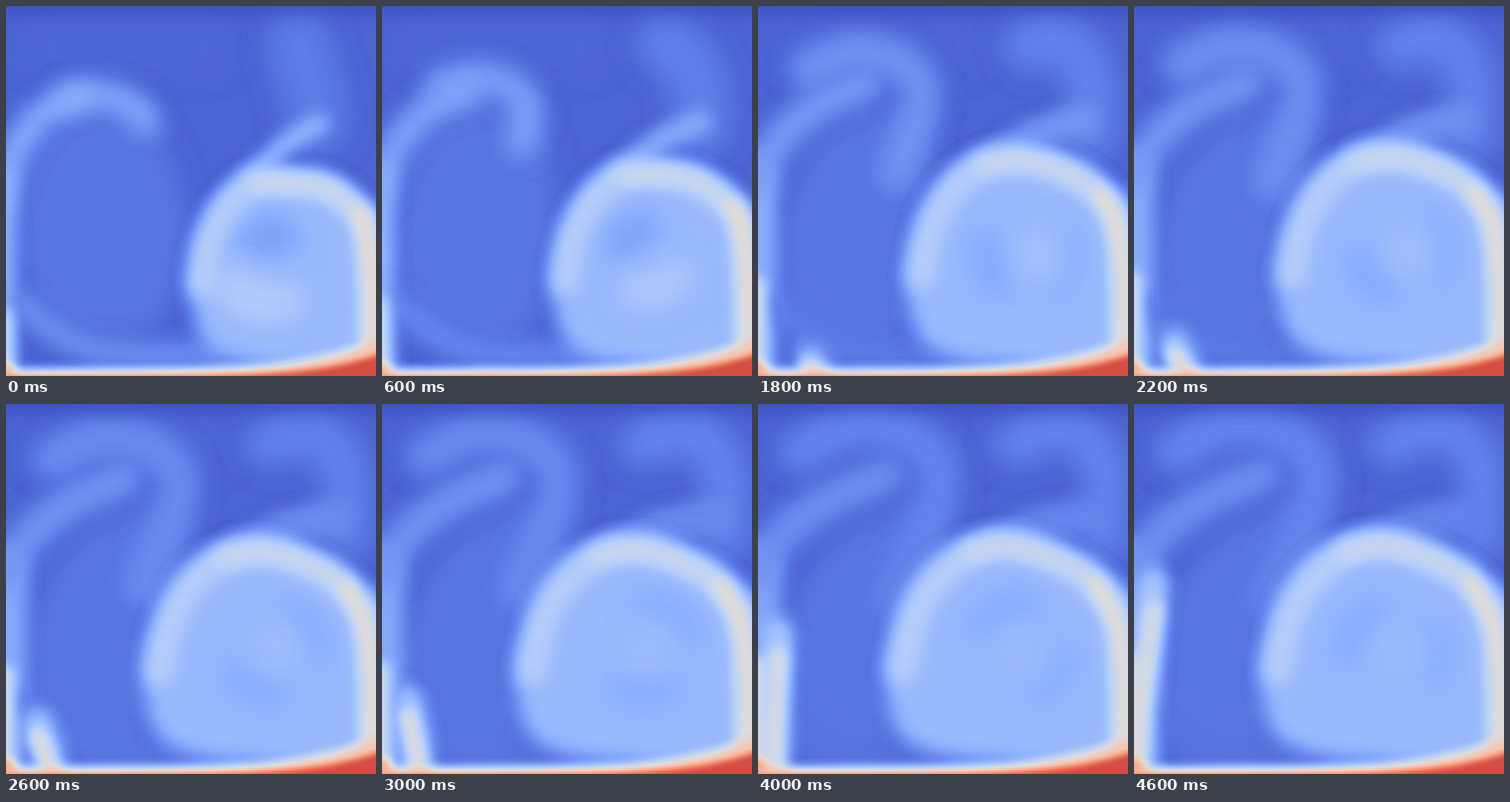
Recreate the animation shown at these times as an HTML page. Size 512 px wide and 512 px high, loop 4800 ms.

```html
<!DOCTYPE html>
<html lang="en">
<head>
<meta charset="utf-8">
<title>Convection</title>
<style>
html, body { margin: 0; width: 100%; height: 100%; overflow: hidden; background: #3b4cc0; }
svg { display: block; width: 100vw; height: 100vh; }
</style>
</head>
<body>
<svg viewBox="0 0 512 512" preserveAspectRatio="none">
  <defs id="defs"></defs>
  <g id="field" filter="url(#coolwarm)"><rect x="-2" y="-2" width="516" height="516" fill="rgb(14,14,14)"/></g>
</svg>
<script>
const NS = 'http://www.w3.org/2000/svg';
const LOOP = 4800, STEP = 200;

// Colours for evenly spaced temperatures from 0 to 1.
const COOLWARM = ['#3b4cc0', '#6282ea', '#8db0fe', '#b8d0f9', '#dddddd', '#f5c4ad', '#f4987a', '#de604d', '#b40426'];

const lerp = (a, b, k) => a + (b - a) * k;
const mix = (a, b, k) => a.map((p, i) => [lerp(p[0], b[i][0], k), lerp(p[1], b[i][1], k)]);
const morph = (from, to) => (p, e) => mix(from, to, e);

// The large cell; its first seven points are the upper-left edge.
const cell = morph(
  [[258, 390], [270, 320], [302, 262], [345, 232], [400, 232], [455, 242], [500, 278], [540, 330], [540, 490], [380, 500], [280, 470]],
  [[178, 370], [197, 290], [230, 232], [282, 190], [340, 177], [410, 196], [475, 234], [540, 300], [540, 490], [340, 495], [205, 465]]);

// The ring runs just inside that edge and down the right wall.
const ring = first => (p, e) => cell(p, e).slice(0, 7)
  .map(([x, y]) => [lerp(x, 370, .1), lerp(y, 360, .1)])
  .concat([[496, 302], [505, 370], [507, 470]]).slice(first);

// A short arc turning with the flow inside the cell.
const swirl = (lag, radius) => (p, e) => [-35, 0, 35].map(spread => {
  const angle = (270 - 270 * p - lag + spread) * Math.PI / 180, r = radius(e);
  return [365 + r * Math.cos(angle), 345 + r * Math.sin(angle)];
});

// Heated floor, thicker towards the right corner.
const floor = (base, slope, rise) => () => {
  const top = [];
  for (let u = -.1; u < 1.15; u += .1) top.push([u * 512, base - slope * u - rise * u ** 6]);
  return [...top, [620, 560], [-60, 560]];
};

// The young plume drifts left along the floor while it climbs.
const plume = lag => p => {
  const root = 155 - 154 * p, tip = 28 + 190 * (1 - p) ** 3, y = 535 - 270 * p * p + lag * p;
  return [[root, 540], [lerp(root, tip, .4), lerp(530, y, .5)], [tip, y]];
};

// v: temperature and w: stroke width, each from start to end; no w means a filled shape.
const layers = [
  { blur: 18, v: [.068, .06], w: [70, 70], path: () => [[60, 55], [280, 55]] },
  { blur: 18, v: [.098, .098], path: morph(
    [[15, 300], [70, 160], [190, 150], [250, 300], [200, 450], [60, 440]],
    [[40, 300], [120, 180], [250, 140], [210, 290], [190, 480], [40, 480]]) },
  // left wall, bottom sweep, left plume
  { blur: 11, v: [.29, .22], w: [26, 70], path: morph([[-2, 235], [-2, 560]], [[-2, 225], [-2, 560]]) },
  { blur: 14, v: [.17, .09], w: [30, 30], path: () => [[20, 410], [65, 450], [140, 480], [300, 480]] },
  { blur: 15, v: [.25, .165], w: [36, 48], path: morph(
    [[-10, 270], [10, 205], [50, 150], [100, 125]], [[0, 230], [35, 180], [100, 132], [180, 98]]) },
  { blur: 16, v: [.25, .132], w: [34, 62], path: morph(
    [[85, 128], [125, 122], [160, 130], [185, 145], [195, 162]],
    [[60, 65], [130, 30], [215, 45], [252, 115], [190, 270]]) },
  // right plume: cap and tail
  { blur: 18, v: [.115, .135], w: [90, 62], path: morph(
    [[405, 50], [412, 80], [425, 120], [430, 160]], [[355, 55], [430, 32], [478, 85], [480, 185]]) },
  { blur: 10, v: [.26, .13], w: [28, 52], path: morph(
    [[335, 240], [385, 193], [432, 163]], [[305, 208], [380, 170], [460, 155]]) },
  // cell, cool pockets, warm core, ring
  { blur: 13, v: [.29, .285], path: cell },
  { blur: 18, v: [.2, .25], w: [52, 42], path: swirl(0, e => 30 + 35 * e) },
  { blur: 18, v: [.3, .235], w: [40, 40], path: swirl(150, () => 72) },
  { blur: 18, v: [.37, .3], w: [46, 46], path: swirl(165, e => 68 * (1 - e)) },
  { blur: 12, v: [.38, .375], w: [34, 38], path: ring(0) },
  { blur: 10, v: [.45, .44], w: [20, 20], path: ring(3) },
  { blur: 9, v: [.56, .55], w: [16, 16], path: ring(6) },
  // young plume, left corner, floor
  { blur: 11, v: [.3, .34], w: [32, 38], path: plume(-15) },
  { blur: 8, v: [.62, .48], w: [22, 22], path: plume(20) },
  { blur: 9, v: [.45, .5], w: [20, 24], path: morph([[-3, 430], [-3, 560]], [[-3, 360], [-3, 560]]) },
  { blur: 7, v: [.75, .78], w: [28, 36], path: () => [[-4, 508], [0, 530]] },
  { blur: 7, v: [.62, .62], path: floor(504, 3, 40) },
  { blur: 4, v: [.9, .9], path: floor(513, 2, 29) },
  // cold lid
  { blur: 13, v: [0, 0], w: [60, 60], path: () => [[-80, -24], [592, -24]] }
];

function add(parent, tag, attrs) {
  const node = parent.appendChild(document.createElementNS(NS, tag));
  for (const name in attrs) node.setAttribute(name, attrs[name]);
  return node;
}

// Smooth curve through the points, open or closed.
function curve(points, closed) {
  const n = points.length;
  const at = i => points[closed ? (i + n) % n : Math.max(0, Math.min(n - 1, i))];
  let d = 'M' + at(0);
  for (let i = 0; i < (closed ? n : n - 1); i++) {
    const [before, a, b, after] = [at(i - 1), at(i), at(i + 1), at(i + 2)];
    const c1 = a.map((v, j) => v + (b[j] - before[j]) / 6);
    const c2 = b.map((v, j) => v - (after[j] - a[j]) / 6);
    d += `C${c1} ${c2} ${b}`;
  }
  return d;
}

const defs = document.getElementById('defs');
const field = document.getElementById('field');

function addFilter(id, margin) {
  return add(defs, 'filter', {
    id, filterUnits: 'userSpaceOnUse', 'color-interpolation-filters': 'sRGB',
    x: -margin, y: -margin, width: 512 + 2 * margin, height: 512 + 2 * margin
  });
}

const transfer = add(addFilter('coolwarm', 0), 'feComponentTransfer', {});
[...'RGB'].forEach((channel, i) => {
  const levels = COOLWARM.map(hex => parseInt(hex.substr(1 + 2 * i, 2), 16) / 255);
  add(transfer, 'feFunc' + channel, { type: 'table', tableValues: levels.join(' ') });
});

for (const layer of layers) {
  const id = 'blur' + layer.blur;
  if (!document.getElementById(id)) add(addFilter(id, 80), 'feGaussianBlur', { stdDeviation: layer.blur });
  layer.node = add(field, 'path', {
    filter: `url(#${id})`, fill: 'none', 'stroke-linecap': 'round', 'stroke-linejoin': 'round'
  });
}

function draw(t) {
  const p = t / (LOOP - STEP);
  const e = 1 - (1 - p) ** 2;
  for (const { node, path, v, w } of layers) {
    const level = (lerp(...v, e) * 255).toFixed(2);
    node.setAttribute('d', curve(path(p, e), !w));
    node.setAttribute(w ? 'stroke' : 'fill', `rgb(${level},${level},${level})`);
    if (w) node.setAttribute('stroke-width', lerp(...w, e));
  }
}

const start = performance.now();
let shown = -1;
function tick() {
  const time = (performance.now() - start) % LOOP;
  const t = Math.floor(time / STEP) * STEP;
  if (t !== shown) draw(shown = t);
  requestAnimationFrame(tick);
}
tick();
</script>
</body>
</html>
```
